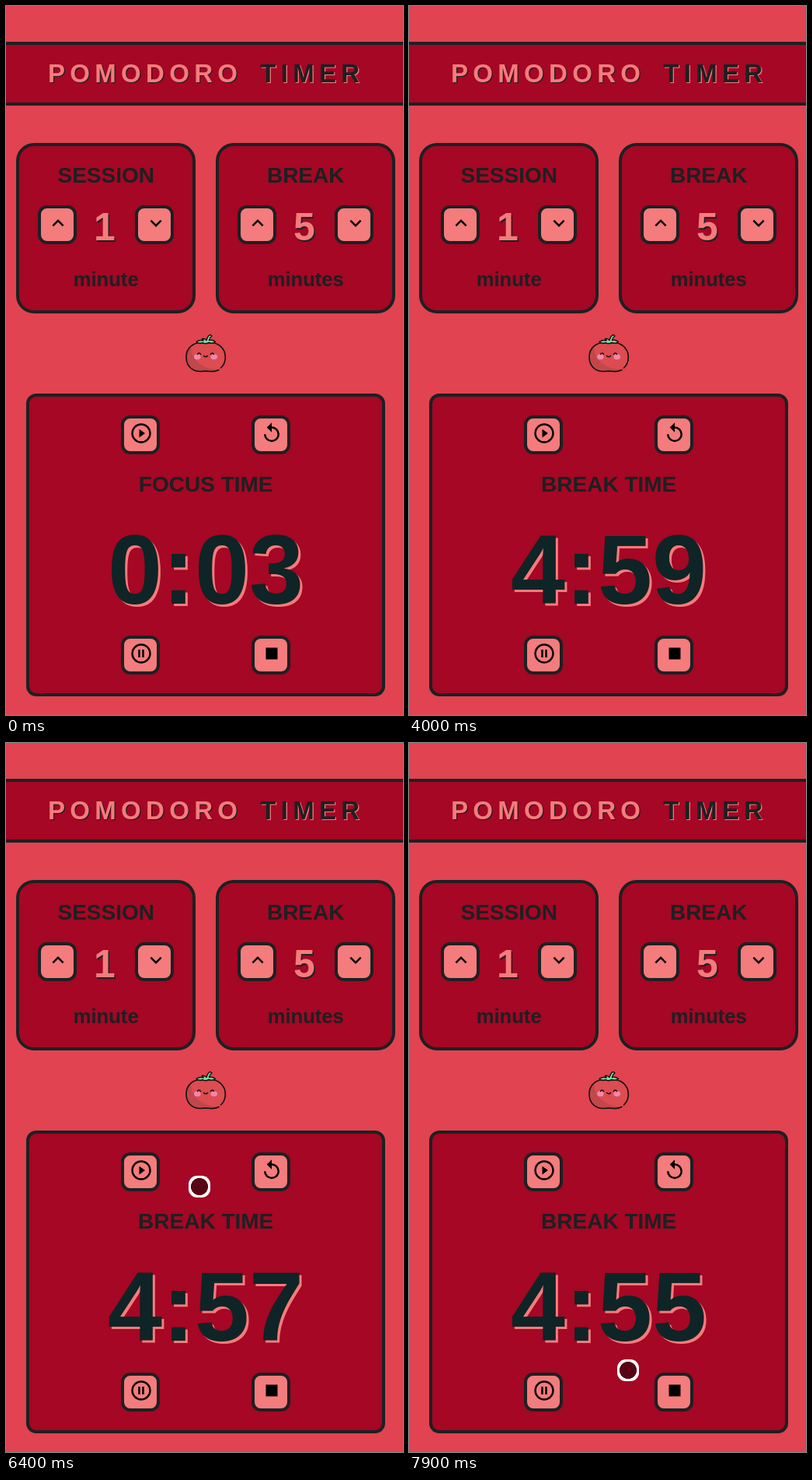
An HTML page for the animation above (8000 ms loop, 511 px wide and 911 px high).

```html
<!DOCTYPE html>
<html lang="en">
<head>
<meta charset="utf-8">
<title>Pomodoro Timer</title>
<style>
  html, body { margin: 0; width: 100%; height: 100%; overflow: hidden; background: #e14350; }
  svg { position: absolute; left: 0; top: 0; font: bold 28px "Liberation Sans", Arial, sans-serif; }
  .panel { fill: #a50724; stroke: #1c2023; stroke-width: 4; }
  .button { fill: #f47c7c; stroke: #1c2023; stroke-width: 4; }
  .dark { fill: #1c2023; }
  .pink { fill: #f47c7c; }
  .ink { fill: #0f2426; }
  .middle { text-anchor: middle; }
  .title { font-size: 33px; letter-spacing: 6.3px; }
  .number { font-size: 50px; }
  .unit { font-size: 25.6px; }
  .clock { font-size: 126px; }
  #cursor {
    position: absolute; left: -14px; top: -14px; width: 28px; height: 28px;
    border-radius: 11px; visibility: hidden;
    background: radial-gradient(circle, rgba(0, 0, 0, .47) 10.7px, #fff 11.4px);
  }
</style>
</head>
<body>
<svg id="stage" width="511" height="911" viewBox="0 0 511 911"></svg>
<div id="cursor"></div>
<script>
const stage = document.getElementById('stage');
const cursor = document.getElementById('cursor');

const icons = {
  up: '<path d="M12 8l-6 6 1.41 1.41L12 10.83l4.59 4.58L18 14z"/>',
  down: '<path d="M16.59 8.59L12 13.17 7.41 8.59 6 10l6 6 6-6z"/>',
  play: '<circle cx="12" cy="12" r="9.2" fill="none" stroke="#000" stroke-width="1.9"/><path d="M10 7.7v8.6l6-4.3z"/>',
  pause: '<circle cx="12" cy="12" r="9.2" fill="none" stroke="#000" stroke-width="1.9"/><path d="M9 8h2v8H9zM13 8h2v8h-2z"/>',
  reset: '<path d="M12 5V1L7 6l5 5V7a6 6 0 1 1-6 6H4a8 8 0 1 0 8-8z"/>',
  stop: '<path d="M6 6h12v12H6z"/>'
};

// Outer edges; the border lies inside them.
const box = (cls, x, y, w, h, r) =>
  `<rect class="${cls}" x="${x + 2}" y="${y + 2}" width="${w - 4}" height="${h - 4}" rx="${r - 2}"/>`;

const label = (cls, x, y, text) => `<text class="${cls}" x="${x}" y="${y}">${text}</text>`;

const shadowed = (cls, x, y, text, front, back, offset) =>
  label(`${cls} ${back}`, x + offset, y + offset, text) + label(`${cls} ${front}`, x, y, text);

const button = (name, x, y, dx = 1) => box('button', x, y, 50, 50, 12) +
  `<g transform="translate(${x + 10 + dx} ${y + 8}) scale(1.25)">${icons[name]}</g>`;

const setting = (x, name, value, unit) =>
  box('panel', x, 176, 231, 219, 23) +
  label('middle dark', x + 115.7, 227, name) +
  button('up', x + 28, 256) +
  shadowed('number middle', x + 114, 301, value, 'pink', 'dark', 1.5) +
  button('down', x + 153, 256, 2) +
  label('unit middle dark', x + 115.7, 360, unit);

const tomato = `
  <g stroke-linecap="round" stroke-linejoin="round">
    <path fill="#dc4c50" d="M257 433C241 430 231.500 440 232 452C232.500 464 241 470 251 469.500Q257 468.800 263 469.500C274 470 282 463 282.300 452C282.600 440 273 430 257 433Z"/>
    <path fill="#c2474b" d="M238 437C230 444 230 459 239 466Q246 470.500 255 469Q264 470.500 272 467C252 466 238 455 238 437Z"/>
    <path fill="none" stroke="#111" stroke-width="1.600" d="M274 467.500Q269 470 263 469.500Q257 468.800 251 469.500C241 470 232.500 464 232 452C231.500 440 241 430 257 433C273 430 282.600 440 282.300 452Q282 460 276.500 465"/>
    <g fill="#f287ae"><ellipse cx="246.300" cy="450.700" rx="4.300" ry="3.500"/><ellipse cx="267.700" cy="450.700" rx="4.300" ry="3.500"/></g>
    <path fill="none" stroke="#111" stroke-width="1.500" d="M246.500 447.500q2-3 4 0M263.500 447.500q2-3 4 0M254.500 449.500q2.500 2.600 5 0"/>
    <path fill="#7fdca4" stroke="#111" stroke-width="1.500" d="M245 431.500Q249 428.500 254 430L252.500 427.500Q256.500 427 258 429.500Q260 423 263 422.500L265 424Q262 426 261.500 429.500Q266 428.500 269.500 431.500Q265 434.500 261 432.500Q257 435 253 432.700Q248.500 434.500 245 431.500Z"/>
  </g>`;

stage.innerHTML =
  '<path class="panel" d="M-4 48H515V126H-4Z"/>' +
  shadowed('title', 54, 98, 'POMODORO', 'pink', 'dark', 1.2) +
  shadowed('title', 327.3, 98, 'TIMER', 'dark', 'pink', 1.2) +
  setting(13, 'SESSION', '1', 'minute') +
  setting(270, 'BREAK', '5', 'minutes') +
  tomato +
  box('panel', 26, 498, 462, 389, 13) +
  button('play', 148, 526) + button('reset', 316, 526) +
  label('middle dark mode', 257.2, 624, '') +
  shadowed('clock middle', 257, 768, '', 'ink', 'pink', 3) +
  button('pause', 148, 809) + button('stop', 316, 809);

const mode = stage.querySelector('.mode');
const clocks = stage.querySelectorAll('.clock');

const DURATION = 8000;
const FRAME = 100;
const ticks = [
  [0, '0:03'], [600, '0:02'], [2000, '0:01'], [3000, '0:00'], [4000, '4:59'],
  [4600, '4:58'], [5600, '4:57'], [6600, '4:56'], [7500, '4:55']
];
// Time, x, y; the pointer pauses briefly at repeated places.
const path = [
  [4800, 155, 23], [5100, 184, 163], [5200, 184, 163], [5600, 221, 401],
  [5700, 221, 401], [6100, 249, 533], [6200, 249, 533], [6400, 249, 570],
  [6600, 256, 648], [6700, 256, 648], [7000, 259, 692], [7100, 259, 692],
  [7400, 261, 726], [7500, 264, 758], [7600, 264, 758], [7900, 282, 806]
];

function pointerAt(time) {
  const next = path.findIndex(point => point[0] > time);
  if (next < 0) return path[path.length - 1].slice(1);
  const [t0, x0, y0] = path[next - 1];
  const [t1, x1, y1] = path[next];
  const k = (time - t0) / (t1 - t0);
  return [Math.round(x0 + (x1 - x0) * k), Math.round(y0 + (y1 - y0) * k)];
}

function draw() {
  const time = Math.floor(performance.now() % DURATION / FRAME) * FRAME;
  const reading = ticks.filter(tick => tick[0] <= time).pop()[1];
  clocks.forEach(clock => { clock.textContent = reading; });
  mode.textContent = time < 4000 ? 'FOCUS TIME' : 'BREAK TIME';

  const visible = time >= path[0][0];
  cursor.style.visibility = visible ? 'visible' : 'hidden';
  if (visible) {
    const [x, y] = pointerAt(time);
    cursor.style.transform = `translate(${x}px, ${y}px)`;
  }
  requestAnimationFrame(draw);
}
draw();
</script>
</body>
</html>
```
